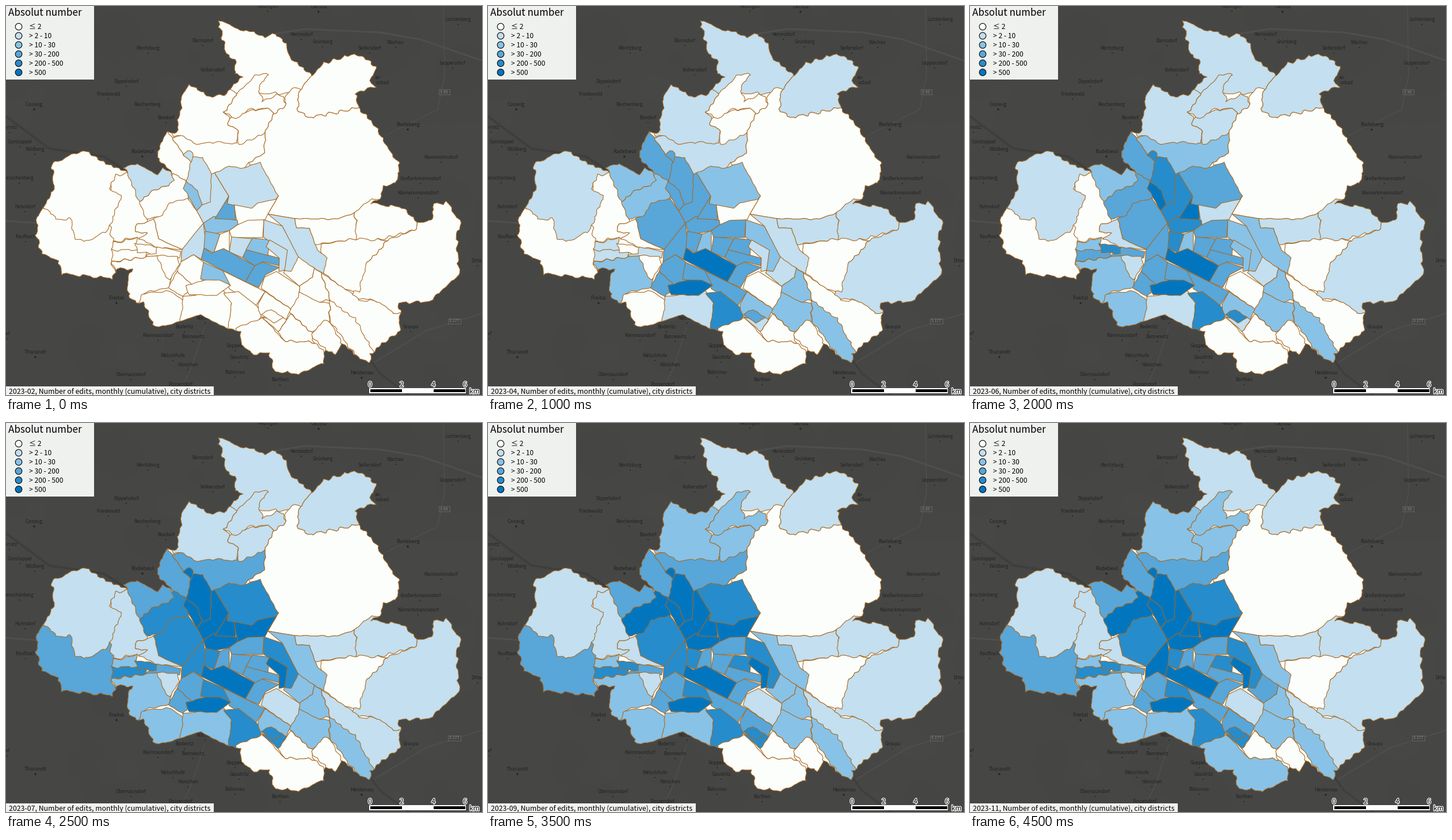
Write a matplotlib script that moves like this. It is 827 px wide and 677 px high and loops after 5 s.

```python
import matplotlib.pyplot as plt
import matplotlib.patheffects as pe
import numpy as np
from matplotlib.animation import FuncAnimation
from matplotlib.patches import Circle, Polygon, Rectangle

W, H, DPI = 827, 677, 64
PX = 72 / DPI
SANS = "Noto Sans CJK JP"
SHADES = ["#fcfefb", "#c3dff0", "#88c2e7", "#59a6d9", "#278ccb", "#0176bf"]
BORDER = "#a8691f"
GROUND, INK, ROAD, RIVER = "#464745", "#222322", "#4f504e", "#3e3f3d"
FIRST, MONTHS = 2, 10

fig = plt.figure(figsize=(W / DPI, H / DPI), dpi=DPI, facecolor=GROUND)
ax = fig.add_axes([0, 0, 1, 1])
ax.set_xlim(0, W)
ax.set_ylim(H, 0)
ax.axis("off")


def write(x, y, text, size, color="black", ha="left", **kw):
    return ax.text(x, y, text, fontsize=size * PX, color=color, ha=ha,
                   va="baseline", family=SANS, **kw)


def box(x, y, w, h, color, z=5, edge="none", lw=0.0):
    ax.add_patch(Rectangle((x, y), w, h, fc=color, ec=edge, lw=lw * PX, zorder=z))


def dot(x, y, r, fill, edge="none", lw=0.0, z=2):
    ax.add_patch(Circle((x, y), r, fc=fill, ec=edge, lw=lw * PX, zorder=z))


# Base map: soft relief, roads, place names
rng = np.random.default_rng(4)
gx, gy = np.meshgrid(np.linspace(0, W, 207), np.linspace(0, H, 170))
relief = np.zeros_like(gx)
for _ in range(60):
    cx, cy, r = rng.uniform(0, W), rng.uniform(0, H), rng.uniform(15, 60)
    relief += rng.choice([-1, 1]) * np.exp(-((gx - cx)**2 + (gy - cy)**2) / r**2)
tone = 70.5 + 1.2 * np.tanh(relief)
ax.imshow(np.dstack([tone, tone + 1, tone - 1]) / 255, extent=(0, W, H, 0),
          aspect="auto", interpolation="bilinear", zorder=0)


def road(color, width, *xy):
    ax.plot(xy[::2], xy[1::2], color=color, lw=width * PX, zorder=1)


road(ROAD, 3, 0, 374, 55, 378)
road(ROAD, 3, 470, 48, 520, 40, 650, 46, 720, 58, 827, 95)
road(ROAD, 1.5, 660, 225, 750, 180, 762, 120, 760, 0)
road(ROAD, 2, 640, 620, 730, 565, 827, 535)
road(ROAD, 1.5, 300, 677, 322, 630, 345, 560)
road(RIVER, 4, 0, 192, 75, 248, 170, 262, 210, 288)
road(RIVER, 3, 630, 612, 650, 640, 700, 677)


def place(x, y, name, size=8, r=1.0):
    write(x, y + 3, name, size, INK, "center", zorder=2)
    dot(x, y + 9, r, INK)


def town(x, y, name):
    place(x, y, name, 9, 1.7)


place(455, 0, "Medingen")
place(785, 23, "Lichtenberg")
place(513, 49, "Hermsdorf")
place(342, 60, "Bärnsdorf")
place(550, 62, "Grünberg")
place(247, 73, "Moritzburg")
place(677, 63, "Wachau")
place(632, 73, "Seifersdorf")
place(776, 99, "Leppersdorf")
place(359, 111, "Volkersdorf")
place(209, 131, "Dippelsdorf")
place(178, 153, "Friedewald")
place(246, 171, "Reichenberg")
place(278, 194, "Boxdorf")
place(647, 124, "au-", r=0)
place(654, 133, "usbad", r=0)
place(6, 211, "uernitz")
place(24, 236, "Constappel")
place(50, 249, "Wildberg")
place(756, 263, "Kleinwolmsdorf")
place(720, 300, "Großerkmannsdorf")
place(716, 325, "Kleinerkmannsdorf")
place(23, 299, "einschönberg")
place(33, 349, "Huhndorf")
place(34, 401, "Kaufbach")
place(819, 443, "Ditter")
place(703, 558, "Graupa")
place(346, 543, "Nöthnitz")
place(310, 558, "Boderitz")
place(325, 575, "Bannewitz")
place(264, 573, "Kleinnaundorf")
place(398, 591, "Goppeln")
place(405, 611, "Gaustritz")
place(290, 608, "Welschhufe")
place(316, 624, "Hänichen")
place(398, 637, "Babisnau")
place(217, 641, "Obernaundorf")
place(303, 658, "Possendorf")
place(476, 650, "Borthen")
place(2, 570, "orf")
town(543, 1, "Okrilla")
town(49, 171, "Coswig")
town(698, 206, "Radeberg")
town(237, 253, "Radebeul")
town(192, 508, "Freital")
town(51, 602, "Tharandt")
town(618, 638, "Heidenau")
for x, y, w, name in [(761, 149, 19, "S 95"), (779, 548, 22, "S 177")]:
    box(x - w / 2, y - 4.5, w, 9, GROUND, 2, "#6c6d6a", 0.8)
    write(x, y + 2.5, name, 7, "#8c8d8a", "center", zorder=3)


def ragged(xy):
    """Subdivide an outline and shake it by a field that grows away from the
    centre, so that neighbours sharing two corners share the whole edge."""
    pts = np.reshape(xy, (-1, 2)).astype(float)
    parts = []
    for a, b in zip(pts, np.roll(pts, -1, axis=0)):
        n = max(2, int(np.hypot(*(b - a)) / 4))
        parts.append(a + (b - a) * np.arange(n)[:, None] / n)
    x, y = np.concatenate(parts).T
    amp = 1.7 * np.clip(np.hypot(x - 410, y - 410) / 150 - 0.5, 0, 1)
    dx = np.sin(x / 2.9 + y / 4.3) + 0.6 * np.sin(x / 5.7 - y / 2.3)
    dy = np.sin(y / 3.1 - x / 4.1) + 0.6 * np.sin(x / 2.5 + y / 6.1)
    return np.column_stack([x + amp * dx, y + amp * dy])


north = [55, 368, 83, 314, 80, 275, 118, 257, 135, 253, 211, 291, 204, 281, 229, 274,
         262, 294, 271, 282, 288, 291, 262, 262, 280, 217, 296, 222, 306, 160, 318, 139,
         357, 158, 384, 153, 411, 121, 397, 118, 401, 95, 383, 82, 368, 25, 397, 37,
         452, 53, 470, 47, 486, 66, 494, 91, 533, 121, 552, 100, 600, 84, 630, 93,
         642, 107, 634, 130, 641, 140, 607, 152, 613, 176, 650, 221, 660, 243, 685, 275,
         676, 309, 658, 312, 650, 335, 635, 344, 693, 351, 714, 377]
south = [738, 374, 745, 345, 767, 342, 790, 378, 783, 400, 787, 467, 765, 487, 740, 514,
         682, 517, 685, 535, 683, 566, 632, 605, 634, 619, 612, 613, 585, 588, 573, 607,
         556, 598, 550, 622, 510, 640, 467, 636, 457, 603, 430, 606, 409, 588, 407, 566,
         386, 562, 338, 537, 277, 557, 257, 556, 238, 514, 228, 518, 213, 506, 211, 472,
         220, 458, 192, 458, 186, 474, 97, 466, 90, 441, 62, 432, 53, 400]
rim = ragged(north + south)
city = ax.add_patch(Polygon(rim, fc=SHADES[0], ec="none", zorder=2.5))
ax.add_patch(Polygon(rim, fc="none", ec=BORDER, lw=1.1 * PX, zorder=4))

districts = []


def area(steps, *corners):
    """steps is {month: class from then on}. Later areas cover earlier ones and
    the city limit trims them, so hidden edges may be loose."""
    level, levels = 0, []
    for month in range(FIRST, FIRST + MONTHS):
        level = steps.get(month, level)
        levels.append(level)
    patch = ax.add_patch(Polygon(ragged(corners), ec=BORDER, lw=1.1 * PX,
                                 joinstyle="round", zorder=3))
    patch.set_clip_path(city)
    districts.append((patch, levels))


# North
area({4: 1}, 340, 10, 533, 10, 533, 121, 511, 146, 487, 152, 404, 152, 384, 152, 340, 100)
area({4: 1}, 533, 121, 560, 60, 670, 60, 660, 150, 607, 152, 613, 176, 576, 185, 551, 190,
     524, 195, 505, 182, 511, 146)
area({}, 484, 158, 498, 143, 511, 146, 505, 182, 524, 195, 551, 190, 576, 185, 613, 176,
     700, 180, 700, 330, 635, 344, 606, 360, 575, 371, 501, 370, 455, 362, 473, 331,
     421, 273, 449, 256, 450, 221, 466, 190, 487, 171)
area({3: 1, 5: 2, 7: 3}, 287, 229, 304, 226, 450, 221, 449, 256, 421, 273, 411, 285,
     360, 295, 308, 257)
area({3: 1, 8: 2}, 304, 226, 331, 240, 365, 237, 402, 240, 402, 213, 386, 209, 389, 197,
     380, 186, 404, 152, 384, 140, 318, 120, 280, 150, 290, 226)
area({5: 1, 8: 2}, 389, 197, 409, 185, 457, 178, 466, 190, 450, 221, 404, 242, 402, 213,
     386, 209)
area({6: 1, 9: 2}, 433, 119, 454, 120, 438, 141, 446, 166, 475, 152, 487, 171, 466, 190,
     457, 178, 421, 181, 398, 197, 380, 186, 404, 152)

# North-west
area({3: 3}, 287, 229, 308, 257, 324, 272, 314, 305, 288, 291, 255, 262, 280, 210)
area({2: 1, 3: 3, 5: 4, 7: 5}, 357, 292, 363, 291, 387, 331, 366, 368, 343, 378, 331, 356,
     341, 346, 350, 315)
area({2: 1, 3: 3, 6: 4, 7: 5}, 324, 264, 341, 263, 357, 292, 355, 341, 341, 346, 313, 305)
area({2: 1, 3: 3, 6: 4, 7: 5}, 308, 257, 321, 252, 326, 264, 322, 272)
area({2: 1, 3: 2, 5: 3, 7: 4}, 363, 291, 388, 278, 409, 283, 441, 272, 450, 289, 473, 331,
     458, 350, 400, 355, 384, 346, 387, 331)
area({6: 1, 7: 5}, 396, 346, 427, 352, 437, 343, 470, 336, 455, 362, 450, 372, 402, 381)
area({2: 2, 3: 3, 6: 4, 7: 5}, 361, 366, 402, 373, 403, 380, 388, 391, 349, 399, 343, 378)
area({2: 3, 5: 4, 6: 5}, 387, 331, 384, 344, 397, 347, 399, 372, 363, 370)
area({3: 2, 6: 3, 7: 4, 8: 5}, 230, 342, 258, 320, 282, 312, 291, 292, 314, 305, 318, 340,
     271, 366, 240, 371)
area({2: 2, 3: 3, 5: 4, 6: 5}, 313, 305, 332, 321, 341, 346, 331, 356, 309, 317)
area({2: 1, 4: 2, 7: 3}, 211, 293, 195, 270, 229, 260, 288, 290, 291, 302, 282, 312,
     258, 320, 230, 342)
area({3: 2, 4: 3, 7: 4}, 257, 370, 271, 364, 283, 343, 316, 335, 331, 356, 343, 378,
     323, 408, 306, 424, 265, 405)

# West
area({7: 3}, 40, 350, 68, 352, 120, 368, 185, 365, 192, 420, 182, 446, 200, 480, 40, 480)
area({7: 1}, 185, 295, 211, 291, 246, 376, 228, 380, 225, 392, 245, 396, 243, 406,
     218, 403, 187, 412, 179, 380)
area({4: 1}, 68, 352, 50, 300, 70, 240, 180, 240, 211, 291, 190, 295, 181, 318, 200, 328,
     186, 372, 173, 393, 137, 411, 119, 404, 112, 371, 88, 371)
area({6: 1}, 246, 376, 257, 370, 265, 405, 306, 424, 262, 420, 231, 406, 245, 396,
     225, 392, 228, 380)
area({3: 1, 4: 2}, 182, 446, 262, 434, 290, 440, 284, 490, 240, 499, 236, 520, 205, 520,
     190, 457)
area({6: 2}, 238, 500, 286, 496, 312, 515, 308, 570, 240, 570, 232, 516)
area({3: 1, 6: 2}, 187, 413, 227, 403, 229, 426, 211, 431, 185, 426)
area({4: 1, 5: 3, 7: 4}, 185, 425, 225, 424, 244, 430, 243, 437, 182, 445)
area({3: 1, 6: 3}, 243, 437, 262, 419, 304, 427, 302, 439, 262, 434)
area({5: 3, 6: 4}, 225, 412, 262, 420, 260, 431, 228, 429)
area({6: 1}, 262, 434, 298, 436, 301, 450, 284, 476, 277, 470)

# Centre
area({2: 1, 3: 2, 4: 3, 7: 4, 10: 5}, 343, 378, 348, 420, 341, 442, 326, 433, 304, 445,
     306, 424, 331, 392)
area({3: 3}, 326, 433, 345, 447, 341, 478, 326, 488, 297, 461, 304, 445)
area({3: 1, 4: 3}, 297, 461, 326, 487, 308, 506, 283, 490)
area({3: 1, 7: 2}, 308, 506, 378, 496, 392, 515, 386, 575, 300, 575)
area({3: 2, 4: 3}, 377, 461, 450, 497, 434, 521, 388, 492)
area({4: 4}, 378, 500, 404, 497, 434, 521, 444, 532, 442, 543, 406, 570, 386, 562, 392, 517)
area({2: 2, 3: 3, 7: 4}, 343, 446, 377, 461, 390, 487, 338, 475)
area({3: 3, 4: 5}, 312, 487, 345, 477, 371, 477, 390, 486, 366, 504, 318, 502)
area({2: 2, 3: 3, 6: 4}, 346, 392, 372, 397, 361, 430, 344, 421)
area({3: 2, 7: 3}, 372, 397, 388, 391, 388, 428, 361, 430)
area({3: 3}, 402, 381, 420, 373, 448, 372, 446, 403, 392, 403, 388, 391)
area({2: 1, 3: 2, 4: 3}, 392, 402, 428, 405, 411, 438, 388, 428)
area({2: 3, 3: 4, 4: 5}, 344, 421, 357, 430, 378, 422, 432, 452, 416, 480, 339, 441)
area({2: 3}, 432, 452, 440, 444, 475, 455, 451, 468, 439, 490, 416, 480)
area({2: 3}, 411, 438, 418, 423, 475, 439, 474, 452, 447, 445, 432, 452)
area({2: 2, 4: 3, 8: 4}, 428, 404, 458, 407, 455, 434, 417, 424)

# East
area({4: 1}, 501, 370, 575, 371, 606, 360, 612, 405, 537, 415, 527, 387, 505, 386)
area({4: 1}, 606, 360, 635, 335, 700, 340, 714, 377, 709, 390, 640, 409, 607, 405, 609, 378)
area({4: 1}, 714, 377, 740, 330, 810, 330, 810, 540, 675, 534, 650, 516, 600, 505,
     625, 450, 661, 408, 709, 390)
area({7: 1}, 547, 464, 600, 499, 617, 512, 650, 515, 675, 534, 700, 534, 700, 600,
     632, 640, 600, 552, 565, 515)
area({}, 547, 415, 607, 405, 661, 408, 625, 450, 614, 499, 585, 490, 550, 463)
area({2: 1, 6: 2}, 455, 362, 501, 370, 505, 386, 527, 387, 541, 425, 558, 439, 550, 466,
     508, 440, 480, 383)
area({3: 1, 7: 2, 10: 3}, 508, 437, 535, 457, 533, 472, 510, 487, 482, 464)
area({2: 1, 3: 2, 7: 4}, 448, 372, 480, 383, 508, 437, 495, 462, 480, 460, 487, 430,
     447, 402)
area({2: 1, 5: 2, 7: 5}, 458, 407, 489, 425, 484, 460, 474, 462, 475, 439, 452, 419)
area({3: 2}, 535, 457, 547, 465, 564, 512, 537, 515, 509, 498, 510, 487, 533, 472)
area({3: 2}, 562, 511, 605, 542, 640, 605, 640, 630, 612, 613, 563, 550)
area({4: 2}, 489, 528, 509, 498, 537, 512, 562, 518, 562, 548, 530, 568)
area({7: 1}, 449, 472, 470, 462, 510, 487, 508, 507, 495, 528, 443, 491)
area({10: 2}, 400, 560, 446, 543, 484, 583, 536, 585, 570, 615, 540, 660, 400, 660)
area({3: 1, 4: 2, 9: 3}, 450, 497, 495, 528, 487, 546, 443, 541, 437, 520)
area({3: 1, 7: 4}, 480, 541, 488, 545, 473, 568, 446, 543)
area({3: 3, 6: 4}, 443, 536, 461, 528, 482, 542, 466, 551)
area({}, 495, 535, 530, 568, 536, 585, 484, 583, 473, 568)
area({}, 529, 573, 548, 550, 560, 547, 585, 588, 573, 607, 556, 598)

# Legend, caption and scale bar
box(0, 0, 152.5, 127.5, "#eff1ee")
write(4, 17, "Absolut number", 17, zorder=6)
labels = ["≤ 2", "> 2 - 10", "> 10 - 30", "> 30 - 200", "> 200 - 500", "> 500"]
for i, (label, shade) in enumerate(zip(labels, SHADES)):
    y = 36 + 15.9 * i
    dot(22, y, 5.8, shade, "black", 1.1, 6)
    write(40, y + 4.2, label, 12, zorder=6)

box(0, 661.5, 361, 16, "#f1f2f0")
caption = write(5, 675, "", 12.3, zorder=6)

halo = [pe.withStroke(linewidth=2.6 * PX, foreground="white")]
box(631, 665, 167.5, 9, "white")
for i in range(4):
    if i < 3:
        box(632.5 + 55 * i, 667, 55, 5, "white" if i == 1 else "black", 6)
    write(632.5 + 55 * i, 662.5, str(2 * i), 12, ha="center", zorder=6, path_effects=halo)
write(805, 674.5, "km", 12, zorder=6, path_effects=halo)


def draw(frame):
    for patch, levels in districts:
        patch.set_facecolor(SHADES[levels[frame]])
    caption.set_text(f"2023-{FIRST + frame:02d}, Number of edits, monthly "
                     "(cumulative), city districts")
    return [caption]


anim = FuncAnimation(fig, draw, frames=MONTHS, interval=500, repeat=True,
                     repeat_delay=0, blit=False)
plt.show()
```
